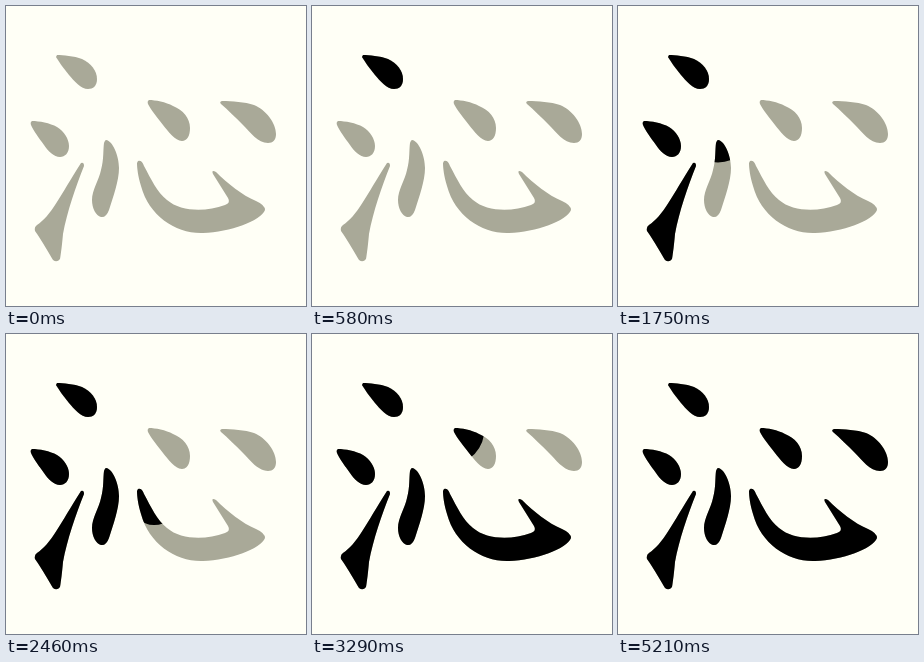
These frames come from a looping animation (300 px wide and 300 px high, 5290 ms). An HTML page:

```html
<!DOCTYPE html>
<html lang="zh">
<head>
<meta charset="utf-8">
<title>Stroke order</title>
<style>
  html, body { margin: 0; width: 100%; height: 100%; overflow: hidden; background: #fffff6; }
  svg { display: block; width: 100%; height: 100%; }
  .ghost { fill: #a9a998; }
  .pen {
    fill: none; stroke: #000; stroke-linejoin: round; stroke-linecap: round;
    stroke-dasharray: 1 3; stroke-dashoffset: 1.01;
  }
</style>
</head>
<body>
<svg id="stage" viewBox="0 0 300 300"></svg>
<script>
const LOOP = 5290;
const NS = 'http://www.w3.org/2000/svg';
const stage = document.getElementById('stage');

// shape: outline, pen: path of the round brush, width: brush width, steps: [ms, drawn share]
const strokes = [
  {
    shape: 'M51 49C57 49 68 50 76 53C85 57 91 65 91 73C91 80 87 83 82 83C75 83 68 75 63 69C58 63 53 56 50 51Z',
    pen: 'M16 30L66 64', width: 72,
    steps: [[150, .2], [440, 1]]
  },
  {
    shape: 'M26 115C33 115 44 117 51 121C58 125 63 133 63 140C63 147 59 151 54 151C48 151 42 145 38 139C33 132 27 124 25 119Q24 116 26 115Z',
    pen: 'M-9 97L38 129', width: 72,
    steps: [[670, .2], [960, 1]]
  },
  {
    shape: 'M75 157Q78 156 78 160C70 180 61 206 57 228C56 239 55 247 54 253Q51 257 47 254C43 247 36 235 29 225Q28 221 31 219C45 210 54 190 75 157Z',
    pen: 'M22 288L66 186', width: 72,
    steps: [[1210, .16], [1500, 1]]
  },
  {
    shape: 'M100 134C107 135 113 150 113 162C113 175 107 191 103 204Q100 212 95 211C90 210 86 202 86 194C86 184 93 174 95 164C98 153 97 144 98 137Q99 134 100 134Z',
    pen: 'M100 97L100 177', width: 72,
    steps: [[1750, .29], [2000, 1]]
  },
  {
    shape: 'M132 155Q136 154 138 160C145 173 151 186 161 194C175 206 200 206 219 199Q225 197 222 192L207 168Q205 163 210 166C222 178 236 189 250 195Q259 199 259 204C255 215 224 226 197 227C170 228 143 210 135 180C132 170 131 162 131 157Z',
    pen: 'M149 128L148 191Q158 215 197 215L252 204L222 176', width: 46,
    steps: [[2250, .04], [2460, .182], [2920, 1]]
  },
  {
    shape: 'M143 94C149 94 160 96 167 100C177 104 184 112 184 122C184 130 181 135 176 135C169 135 162 125 157 119C151 111 145 104 142 98Q141 95 143 94Z',
    pen: 'M110 79L159 109', width: 72,
    steps: [[3210, .32], [3460, 1]]
  },
  {
    shape: 'M216 95C226 95 239 96 248 99C260 104 270 117 270 128C270 134 267 137 262 137C252 137 244 126 237 119C230 112 222 104 215 98Q213 96 216 95Z',
    pen: 'M181 77L245 116', width: 72,
    steps: [[3800, .25], [4000, 1]]
  }
];

function add(parent, tag, attrs) {
  const el = document.createElementNS(NS, tag);
  for (const key in attrs) el.setAttribute(key, attrs[key]);
  return parent.appendChild(el);
}

function keyframes(steps) {
  const at = (ms, share) => ({ offset: ms / LOOP, strokeDashoffset: String(1 - share) });
  const hidden = -.01;
  return [
    at(0, hidden),
    at(steps[0][0], hidden),
    ...steps.map(([ms, share]) => at(ms, share)),
    at(LOOP, 1)
  ];
}

for (const s of strokes) add(stage, 'path', { class: 'ghost', d: s.shape });

strokes.forEach((s, i) => {
  const id = 'stroke' + i;
  add(add(stage, 'clipPath', { id }), 'path', { d: s.shape });
  const pen = add(stage, 'path', {
    class: 'pen', d: s.pen, pathLength: 1,
    'stroke-width': s.width, 'clip-path': `url(#${id})`
  });
  pen.animate(keyframes(s.steps), { duration: LOOP, iterations: Infinity });
});
</script>
</body>
</html>
```
